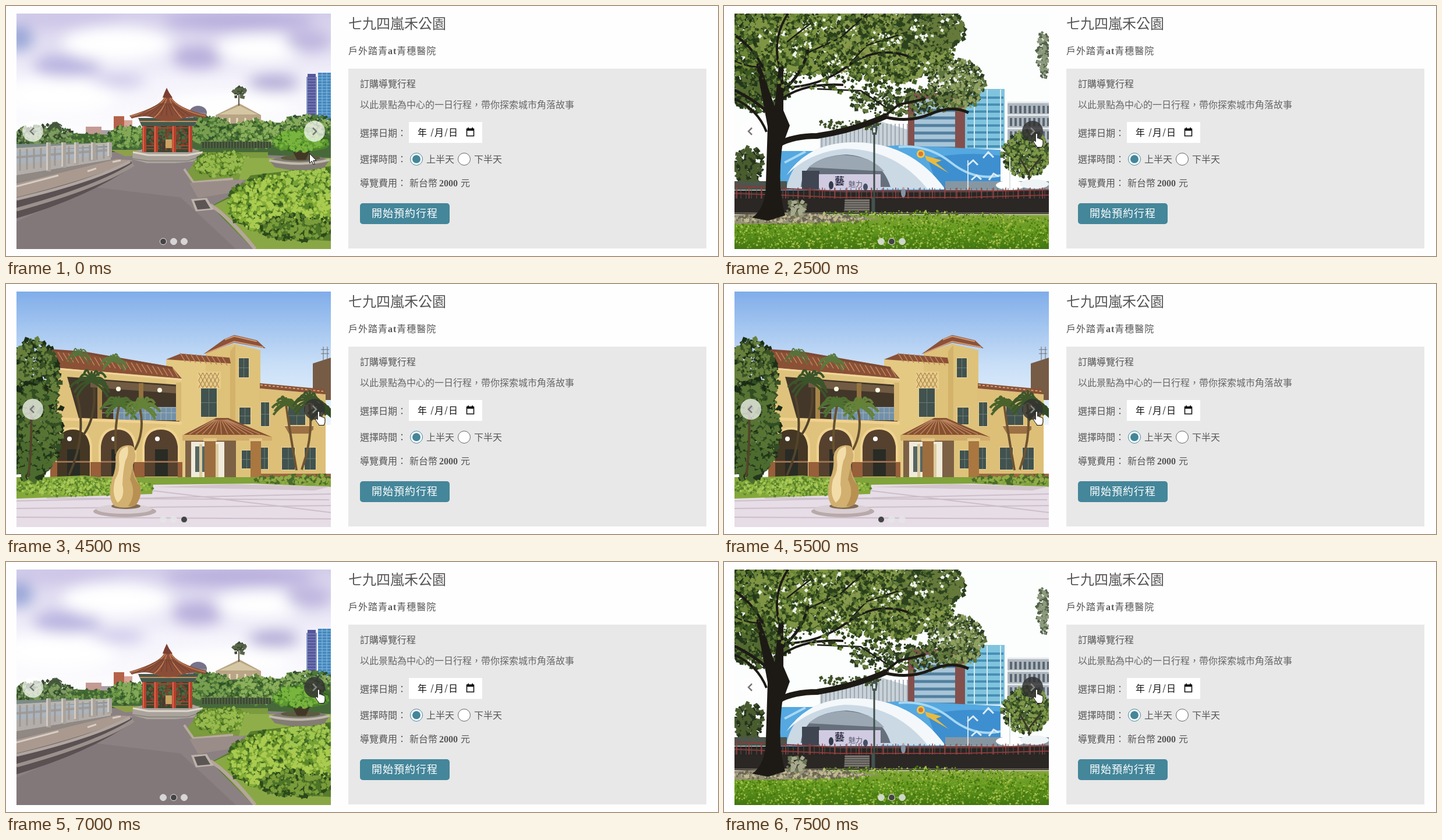
Recreate the animation shown at these times as an HTML page. Size 1223 px wide and 431 px high, loop 8000 ms.

```html
<!DOCTYPE html>
<html lang="zh-Hant-TW">
<head>
<meta charset="utf-8">
<title>導覽行程</title>
<style>
  html, body { margin: 0; width: 100%; height: 100%; overflow: hidden; background: #fefefe; }
  svg { display: block; }
  text { font-family: "Liberation Serif", "Noto Sans CJK TC", "Noto Sans CJK", sans-serif; white-space: pre; }
</style>
</head>
<body>
<svg id="stage" width="1223" height="431" viewBox="0 0 1223 431"></svg>
<script>
let seed = 7;
const rnd = () => (seed = (seed * 16807) % 2147483647) / 2147483647;
const path = (fill, d, more = '') => `<path fill="${fill}" d="${d}" ${more}/>`;
const line = (color, w, d, more = '') =>
  `<path fill="none" stroke="${color}" stroke-width="${w}" d="${d}" ${more}/>`;
const rect = (fill, x, y, w, h, more = '') =>
  `<rect fill="${fill}" x="${x}" y="${y}" width="${w}" height="${h}" ${more}/>`;
const oval = (fill, x, y, rx, ry = rx, more = '') =>
  `<ellipse fill="${fill}" cx="${x}" cy="${y}" rx="${rx}" ry="${ry}" ${more}/>`;
const text = (x, y, size, weight, color, str, more = '') =>
  `<text x="${x}" y="${y}" font-size="${size}" font-weight="${weight}" fill="${color}" ${more}>${str}</text>`;
const repeat = (n, fn) => Array.from({ length: n }, (_, i) => fn(i)).join('');
const fade = (id, ...stops) => `<linearGradient id="${id}" x2="0" y2="1">` +
  stops.map(([o, c]) => `<stop offset="${o}" stop-color="${c}"/>`).join('') + '</linearGradient>';

// Scatter of leaves inside an ellipse: a full dark layer, then sparser lighter ones
function leaves(x, y, rx, ry, n, size, ...colors) {
  return colors.map((c, i) => path(c, repeat(Math.round(n / (1 + i * 0.8)), () => {
    const a = rnd() * 6.283, r = Math.sqrt(rnd()), s = size * (0.5 + rnd()), b = rnd() * 6.283;
    const u = s * Math.cos(b), v = s * Math.sin(b);
    const px = x + rx * r * Math.cos(a), py = y + ry * r * Math.sin(a);
    return `M${px.toFixed(1)} ${py.toFixed(1)}l${u.toFixed(1)} ${v.toFixed(1)} ${(-v).toFixed(1)} ${u.toFixed(1)} ${(-u).toFixed(1)} ${(-v).toFixed(1)}z`;
  }))).join('');
}

function palm(x, y, r, color, w = 2) {
  return line(color, w, repeat(13, i => {
    const a = Math.PI * (1.15 + i / 12 * -1.3), k = r * (0.75 + rnd() * 0.4);
    const dx = k * Math.cos(a), dy = -k * Math.sin(a) * 0.75;
    return `M${x} ${y}q${dx * 0.6} ${dy - r * 0.1} ${dx} ${dy + r * 0.45}`;
  }));
}

function pavilion() {
  const stone = '#a9a39c', red = '#b5402c';
  return rect('url(#sky1)', 18, 13, 540, 230) +
    '<g filter="url(#soft)">' +
    oval('#97a5d6', 22, 55, 24, 22) + oval('#cbc2e6', 110, 22, 90, 10) + oval('#b9b4e0', 105, 102, 58, 20) +
    oval('#cdc8ea', 190, 128, 50, 12) + oval('#fff', 190, 66, 95, 30) + oval('#b7addc', 400, 25, 130, 16) +
    oval('#b8aedb', 330, 88, 45, 20) + oval('#fff', 435, 74, 75, 24) + oval('#bdb5de', 520, 60, 40, 18) +
    oval('#b2abd6', 460, 132, 44, 15) + oval('#fff', 90, 155, 100, 30) + oval('#fff', 380, 170, 110, 20) + '</g>' +
    rect('#8598c8', 516, 122, 18, 72) + rect('#54589a', 518, 117, 14, 76) +
    line('#8f92c8', 1, repeat(14, i => `M518 ${124 + i * 5}h14`)) +
    rect('#4387bd', 536, 115, 22, 82) +
    line('#8bbbe0', 1, repeat(15, i => `M536 ${119 + i * 5}h22`) + 'M543 115v80M551 115v80') +
    rect('#c49a94', 137, 208, 27, 18) + rect('#b5624a', 185, 190, 18, 34) + rect('#d8a398', 203, 197, 14, 28) +
    rect('#aaa0a4', 163, 214, 24, 12) +
    oval('#77738a', 330, 184, 15, 12) + rect('#8c8790', 312, 184, 32, 12) +
    path('#b9a585', 'M360 188L401 168L438 188V226H362Z') + path('#d5c7a4', 'M366 187L401 172L432 187Z') +
    line('#e8dfc4', 3, 'M372 193v28M384 193v28M397 193v28M411 193v28M425 193v28') +
    line('#5a5748', 2, 'M400 154v18') + leaves(400, 149, 9, 8, 30, 4, '#3c4a34', '#5a6648') +
    path('#47693a', 'M18 216L180 222L240 214L330 206L440 200L558 205V262H18Z') +
    leaves(65, 224, 55, 16, 260, 4, '#34492e', '#56793f', '#7f9c60') + palm(84, 207, 13, '#45583c') +
    leaves(210, 226, 34, 18, 230, 4, '#34572a', '#5a873d', '#83a957') +
    leaves(150, 232, 45, 10, 130, 3, '#3f6430', '#6c9846') +
    leaves(350, 215, 38, 24, 330, 4, '#2f4f28', '#4c7836', '#789f50') +
    leaves(430, 220, 48, 22, 330, 4, '#38592a', '#5c8a3c', '#8caf5c') +
    leaves(520, 208, 45, 19, 300, 4, '#2f4d28', '#507b37', '#88aa5c') +
    rect('#3b4b32', 335, 234, 120, 11) + line('#6f7a5d', 1, repeat(24, i => `M${336 + i * 5} 232v13`)) +
    // ground
    path('#8b8183', 'M18 262L215 250L340 252L558 262V419H18Z') +
    path('#776d70', 'M18 419V372L150 312L300 330L395 419Z', 'opacity=".45"') +
    path('#8fa04b', 'M180 248H335L318 254L205 259Z') +
    // lake and railing
    path('#a9b4bf', 'M18 240H178V258L18 276Z') + path('#7d8b86', 'M18 238L178 236V243L18 250Z') +
    line('#b9b5b0', 6, 'M18 248L180 238') + line('#a19b97', 4, 'M18 261L180 248') +
    path('#b4aeaa', 'M18 272L180 256V265L18 292Z') + path('#8f8883', 'M18 292L180 265L205 265L18 304Z') +
    line('#9d9893', 3, repeat(13, i => `M${24 + i * 12} ${247 - i * 0.7}V${284 - i * 1.7}`)) +
    repeat(5, i => { const x = [69, 95, 117, 146, 174][i]; return rect(stone, x, 235, 8, 50 - i * 6) + rect('#d0cac3', x, 235, 3, 48 - i * 6); }) +
    path('#a9998f', 'M18 306L190 264L218 266Q160 300 18 338Z') +
    line('#d7cdc2', 3, 'M18 311L90 292M140 285l15-5M183 269l14-3') +
    path('#5b5153', 'M214 268Q140 300 18 330V366Q140 330 220 275Z') +
    line('#b0a6a0', 5, 'M213 268Q150 302 18 333') + line('#9b918c', 6, 'M219 273Q160 312 18 351') +
    // pavilion
    path(stone, 'M218 252L237 246H322L338 253L322 268L290 271H242L217 264Z') +
    line('#e0d8cc', 3, 'M218 252L244 257H312L338 252') + line('#756f6c', 1, 'M217 263L244 267H312L330 261') +
    rect('#38462f', 238, 204, 79, 48) + leaves(278, 226, 36, 20, 110, 4, '#4d6840', '#7b412c') +
    rect('#c9a463', 274, 230, 11, 15) + rect('#4b3a2e', 268, 235, 5, 16) + rect('#4b3a2e', 287, 235, 5, 16) +
    line(red, 2, 'M236 210H320M236 241H262M294 241H320') + line('#c8513a', 1, 'M234 246H264M292 246H322') +
    [234, 254, 285, 313].map(x => rect(red, x, 203, 7, 49) + rect('#d6674c', x + 1, 203, 2, 49)).join('') +
    path('#46594d', 'M227 193H331L323 207H233Z') + line('#cc8e5b', 2, 'M230 199H328') +
    path('#8a4e38', 'M272 157Q264 174 212 189L216 194Q242 186 258 195Q278 202 302 195Q322 187 343 193L345 188Q294 176 284 157Z') +
    line('#bd7a52', 2, 'M274 158Q262 178 214 190M282 158Q298 180 343 190M276 160Q270 180 254 193M281 160Q288 180 302 193') +
    line('#6b3a2c', 1, repeat(10, i => `M${276 + (i - 5) * 2} 168L${276 + (i - 5) * 10} 189`)) +
    path('#7b3f32', 'M269 158L272 150L276 141L280 149L286 158Z') +
    // lawns
    path('#7c9a3e', 'M310 288L338 252H450V282L388 302H316Z') + line('#b8aaa0', 4, 'M306 281L322 304L390 298') +
    leaves(372, 272, 48, 19, 430, 4, '#466a24', '#6c962f', '#98ba4e') +
    path('#9a8d89', 'M315 305L410 299L385 322L330 331Z') +
    path('#8fae4a', 'M410 262H558V290L400 300Z') +
    path('#587d2c', 'M352 345L395 322L420 292L558 276V419H425Z') +
    path('#8aa746', 'M355 345L386 330L400 375L470 400L558 405V419H425Z') +
    line('#b5a69c', 6, 'M351 343Q385 365 428 419') +
    leaves(474, 342, 92, 50, 1200, 5, '#365a20', '#5b8629', '#84ad37', '#aacb50') +
    leaves(520, 300, 40, 24, 240, 5, '#446c25', '#75a235', '#a3c650') +
    leaves(500, 383, 60, 20, 330, 5, '#2b481b', '#4d7427', '#7a9c3a') +
    path('#beb3aa', 'M318 333L345 331L357 351L326 354Z') + path('#5b5653', 'M323 336L342 334L351 349L329 351Z') +
    // planter tree
    path('#837d73', 'M452 266L470 260H540L556 266L546 279L520 283H488L462 278Z') +
    line('#c0b9ae', 4, 'M452 266Q505 278 556 265') + oval('#5b5b3f', 506, 262, 34, 5) +
    path('#423727', 'M490 246H524L515 265H500Z') +
    path('#4c842a', 'M460 243Q463 218 503 213Q548 213 553 244Q530 253 508 248Q480 252 460 243Z') +
    leaves(507, 233, 44, 16, 380, 4, '#35661f', '#5d9a31', '#79b53e');
}

function bandstand() {
  const bark = '#1d1a15';
  return rect('#fcfdfd', 18, 13, 540, 406) +
    // buildings
    path('#c9d2d8', 'M165 220L260 196L318 214V250H165Z') +
    line('#8e9aa5', 1.5, repeat(22, i => `M${168 + i * 7} ${224 - Math.min(i, 14) * 1.5}V246`)) +
    rect('#84504d', 316, 150, 100, 100) + rect('#a8c5d8', 327, 160, 70, 88) +
    line('#527f9f', 5, repeat(6, i => `M327 ${180 + i * 13}h70`)) +
    path('#80c3dd', 'M414 160L440 143H482V246H414Z') + line('#488fb5', 4, repeat(8, i => `M418 ${158 + i * 12}h62`)) +
    line('#d5eef5', 2, 'M430 150v95M452 144v102M475 144v102') +
    rect('#aeb6be', 487, 166, 71, 80) + line('#e9eef0', 3, 'M487 166H558M487 188H558M487 211H558') +
    line('#5a6670', 4, repeat(9, i => `M${493 + i * 8} 172v13m0 8v14m0 9v14`)) +
    // mural
    path('#55a8e0', 'M92 250H170L300 240L475 248V318H92Z') + path('#3d8fd0', 'M350 264Q405 250 475 258V318H370Z') +
    line('#a6d8f3', 4, 'M300 243Q350 238 390 270T475 292M104 270L140 251') +
    line('#dcebf5', 3, 'M418 275l10-9 8 8M445 262l9-10 9 9M455 300l8-11 9 5M425 300l9-8 8 7') +
    path('#e8bb42', 'M345 258L374 266L364 270L386 288L348 266Z') + oval('#f3c848', 338, 255, 7) + oval('#d87a35', 338, 255, 4) +
    // stage shell
    path('#cbd9e4', 'M108 310Q125 240 215 235Q320 232 380 316H108Z') +
    path('#f4f8fa', 'M107 292Q145 236 220 235Q320 233 380 316H350Q294 246 207 246Q146 252 107 292Z') +
    path('#66707c', 'M132 312Q136 260 210 256Q270 260 286 312Z') +
    path('#9ba8b4', 'M145 278Q168 258 208 257Q255 260 275 285Z') +
    rect('#3f4551', 134, 284, 30, 32) + rect('#d0cbe0', 163, 290, 106, 27) +
    text(190, 308, 17, 700, '#303047', '藝') + text(214, 312, 12, 500, '#58566d', '魅力') +
    oval('#343a4c', 184, 309, 4, 7) + oval('#465064', 243, 312, 4, 6) +
    // right side trees, cars
    leaves(520, 255, 40, 38, 520, 4, '#26391e', '#455f2a', '#7f9848') +
    line('#3c3a29', 3, 'M524 285V318M524 290L508 262M525 285L545 260') +
    leaves(549, 84, 9, 38, 95, 4, '#526249', '#8d9a7c') +
    rect('#8797a2', 380, 302, 178, 16) + oval('#fff', 492, 309, 25, 8) + oval('#eef3f6', 533, 307, 25, 8) +
    line('#dce4e3', 2, 'M419 266V316M491 260V316') +
    leaves(43, 275, 25, 30, 180, 5, '#26331c', '#485c2e') + rect('#4d554c', 18, 302, 90, 15) +
    // fence
    rect('#282624', 18, 318, 540, 41) + line('#5d544f', 1, repeat(60, i => `M${20 + i * 9} 314v18`)) +
    line('#8d3838', 2, 'M18 310L205 320H420L558 317M18 323L200 330H410L558 326') +
    line('#9b4441', 1.5, repeat(26, i => `M${22 + i * 21} 313v19`)) +
    rect('#2b2725', 18, 334, 540, 22) + line('#6b6355', 2, 'M18 357H558') +
    path('#57534f', 'M208 333H250V354H206Z') + line('#a5a099', 1, repeat(5, i => `M207 ${335 + i * 4}h43`)) +
    oval('#8494a5', 308, 322, 4, 8) + oval('#c7a697', 308, 314, 2) +
    // lawn
    rect('url(#lawn)', 18, 360, 540, 59) + leaves(290, 390, 350, 36, 1900, 2.2, '#47780f', '#7fa92c', '#a6bf4a') +
    path('#98917a', 'M18 360L110 356L270 366Q160 377 18 375Z') + leaves(125, 367, 120, 6, 200, 3, '#6a6850', '#c3b891') +
    // tree
    leaves(45, 78, 75, 85, 1150, 5.5, '#1e2f15', '#3b5620', '#6c8638') +
    leaves(160, 58, 120, 58, 1700, 5.5, '#243818', '#486427', '#7f9544') +
    leaves(290, 68, 105, 63, 1300, 5.5, '#26391b', '#4b672a', '#86994c') +
    leaves(355, 40, 56, 40, 380, 5.5, '#2c421f', '#64793a') +
    leaves(398, 136, 48, 43, 400, 4.5, '#2c3e21', '#5d743c', '#8f9f60') +
    leaves(305, 165, 90, 24, 240, 4.5, '#2a3d1f', '#62783c') +
    leaves(60, 150, 50, 32, 300, 5, '#25371a', '#526a30') +
    leaves(218, 205, 55, 9, 60, 4, '#3f5229') +
    repeat(34, () => leaves(65 + rnd() * 330, 25 + rnd() * 110, 11, 8, 6, 4, '#eef3e9')) +
    path(bark, 'M48 365Q72 349 72 305L75 208L55 100L61 98L87 173L94 104L102 102L102 180L113 206L100 242Q91 312 105 361L76 370Z') +
    line(bark, 10, 'M94 238Q120 224 160 224Q225 214 280 189') +
    line(bark, 5, 'M275 191Q318 202 355 186T420 184M82 190Q58 165 18 145M97 150Q138 115 144 75') +
    line(bark, 4, 'M70 112Q50 70 20 52M97 110Q80 60 110 13M99 140Q160 142 212 104T320 88M93 165Q132 132 205 136M73 217Q58 178 18 160M272 193L300 170L345 160') +
    line(bark, 2.5, 'M61 105Q38 105 18 94M108 62L155 25M145 80L200 55L246 13M210 106L245 68L315 45M160 143L235 146L280 176') +
    leaves(200, 80, 190, 68, 420, 4.5, '#2b401b', '#6c8538') +
    // lamp
    line('#3e4e49', 3, 'M258 220V355') + line('#44534f', 5, 'M256 330V355') +
    path('#45534f', 'M253 209L258 203L264 209L262 222H255Z') + rect('#d9e2dd', 256, 210, 4, 8) +
    leaves(124, 348, 20, 7, 30, 5, '#6b7657', '#a7a98c');
}

function museum() {
  const wall = '#dfc37d', shade = '#c49d58', dark = '#43372a', tile = '#8a5136';
  const win = (x, y, w, h) => rect('#ead59a', x - 1, y - 1, w + 2, h + 2) + rect('#41524f', x, y, w, h) +
    line('#6c7c72', 1, `M${x + w / 2} ${y}v${h}M${x} ${y + h / 2}h${w}`);
  const tiles = (x, y, n, dx, dy) => line('#c08660', 1.5, repeat(n, i => `M${x + i * dx} ${y + i * dy}l9 15`));
  return rect('url(#sky3)', 18, 13, 540, 230) +
    // walls
    path('#765b45', 'M527 137L558 127V200H527Z') + line('#716d6b', 1, 'M545 108v24M552 108v22M541 113h14M541 120h14') +
    path(wall, 'M76 137L300 160V338H76Z') + path('#e4c983', 'M275 130L385 135V340H275Z') +
    path('#dfc27a', 'M343 119L392 103L437 114V345H343Z') + path('#ddbf78', 'M435 180L549 190V334H435Z') +
    path(shade, 'M385 116L394 105L394 334H385Z', 'opacity=".45"') +
    // roofs
    path(tile, 'M74 113L132 117L285 143L302 163L80 144Z') + tiles(80, 116, 24, 9, 1.3) +
    line('#f0d69d', 3, 'M78 145L302 165') + line('#7e4933', 4, 'M74 114L132 118L286 145') +
    path(tile, 'M275 130L300 120L384 127L386 137L305 132Z') + tiles(299, 119, 9, 9, 0.8) +
    path('#8c5138', 'M339 121L375 95L392 88L431 97L446 111L392 101Z') + line('#d49b72', 2, 'M345 119L392 99L442 109M376 96L392 90L431 99') +
    path(tile, 'M436 171L543 181L549 190L436 180Z') + line('#d6a276', 2, 'M437 174L545 185', 'stroke-dasharray="4 3"') +
    // balcony
    path(dark, 'M105 160L298 174V237L125 231Z') + path('#715b43', 'M145 165L298 177V189L145 178Z') +
    rect('#a98749', 157, 167, 8, 66) + rect('#94733f', 228, 171, 8, 65) + rect('#d7b873', 292, 170, 9, 66) +
    rect('#7190aa', 185, 212, 107, 23) + line('#a9b4b3', 1, 'M165 213H294M165 222H294' + repeat(12, i => `M${185 + i * 9} 212v23`)) +
    oval('#fffbe5', 193, 181, 4) + oval('#fffbe5', 264, 183, 4) + line('#f1d18d', 5, 'M76 232L302 240') +
    // arches
    [87, 163, 238].map((x, i) => path('#f0d391', `M${x - 4} 332V278Q${x - 1} 247 ${x + 28} 247T${x + 61} 278V332Z`) +
      path(i ? '#55412d' : '#443724', `M${x} 332V280Q${x + 3} 251 ${x + 28} 251T${x + 57} 280V332Z`) +
      rect('#292b25', x + 18, 285, 22, 46) + oval('#fff', x + 22, 267, 4) + rect('#9b7150', x, 305, 57, 3)).join('') +
    path('#985f3b', 'M76 307H88V334H76ZM145 307H163V334H145ZM220 307H238V334H220ZM295 307H303V334H295Z') +
    // facade
    rect('#e8cc88', 329, 151, 40, 30) + line('#9b7443', 1, repeat(5, i => `M${331 + i * 7} 153l7 13-7 13M${338 + i * 7} 153l-7 13 7 13`)) +
    win(335, 180, 27, 49) + win(400, 128, 17, 33) + win(401, 213, 19, 29) + win(438, 204, 14, 41) +
    win(485, 210, 29, 34) + win(405, 287, 17, 31) + win(438, 282, 12, 37) + win(474, 282, 22, 38) + win(513, 282, 19, 38) +
    path('#9c7044', 'M478 244H528V251L519 258H486Z') + line('#e7ca8c', 2, 'M478 244H528') +
    // porch
    rect('#7c6145', 308, 266, 87, 70) + rect('#f0eada', 318, 272, 57, 61) +
    rect('#566663', 325, 280, 16, 44) + rect('#566663', 345, 280, 16, 44) + rect('#dccb9e', 332, 276, 5, 57) + rect('#dccb9e', 360, 276, 5, 57) +
    path('#85502f', 'M305 260L361 231L382 231L457 264L421 260Z') +
    line('#bd8662', 1.5, repeat(12, i => `M${358 + i * 2} 234L${315 + i * 11} 259`)) +
    path('#d2ac6b', 'M303 260H440L457 264V270H303Z') + rect('#9c6d3f', 341, 269, 19, 74) + rect('#a9773f', 420, 269, 18, 75) +
    rect('#e4c787', 339, 266, 23, 5) + rect('#e4c787', 418, 266, 22, 5) +
    rect('#9c6940', 438, 327, 120, 8) +
    // ground
    path('#80a33a', 'M18 333H303L558 333V350H18Z') + leaves(500, 337, 70, 7, 130, 4, '#486b2b', '#8fab45') +
    path('#e6dde6', 'M250 346L425 344L558 350V419H18V367Z') +
    path('#d2c5cb', 'M255 350L390 345L558 349L530 356Z') +
    line('#b9a7b4', 2, 'M18 374L558 362M18 387L558 382M18 402L558 405M70 369L555 372M250 356L558 394', 'opacity=".55"') +
    path('#83a83a', 'M18 335L135 330L253 345L251 362L18 370Z') + leaves(130, 350, 120, 14, 450, 3, '#56802a', '#92b842', '#aac959') +
    // planting
    leaves(48, 160, 43, 62, 720, 5, '#1d2f16', '#385225', '#67803c') +
    leaves(50, 247, 44, 80, 800, 6, '#1b2b15', '#324c23', '#577434') +
    leaves(41, 305, 32, 30, 240, 6, '#223619', '#4c6b2f') +
    line('#53442b', 4, 'M43 210Q45 285 38 333M122 192Q140 260 108 330M151 178Q155 230 133 260') +
    palm(124, 122, 21, '#56723b') + palm(147, 168, 36, '#3b5429', 4) + palm(184, 132, 22, '#5c793d', 3) +
    line('#67512f', 4, 'M195 205Q185 254 189 293M230 214Q239 255 221 286') +
    palm(194, 208, 30, '#4f7030', 4) + palm(235, 212, 29, '#648238', 4) +
    line('#6e5432', 4, 'M481 207Q489 265 499 321M521 207Q529 260 508 320') +
    palm(481, 207, 23, '#4a622c', 4) + palm(522, 202, 30, '#3e562a', 4) + palm(543, 218, 22, '#344a25', 4) +
    // sculpture
    oval('#b8aaa9', 204, 392, 54, 10) + oval('#d9ced3', 203, 388, 48, 8) + oval('#806c55', 206, 383, 25, 5) +
    path('#d2b06f', 'M221 289Q222 277 208 278Q190 280 188 299Q190 318 182 336Q174 373 187 383Q206 389 223 381Q235 365 230 347Q218 330 218 312Q225 298 221 289Z') +
    path('#f2dda9', 'M209 280Q193 283 194 302Q197 321 187 338Q181 364 192 377Q205 367 200 346Q201 321 205 305Q212 293 209 280Z') +
    path('#a77c40', 'M218 313Q216 333 230 347Q235 365 223 381Q215 384 210 383Q225 361 213 337Z', 'opacity=".6"');
}

function panel() {
  const teal = '#44869a', ink = '#555';
  return text(588, 39, 24, 500, ink, '七九四嵐禾公園') +
    text(588, 83, 16, 500, ink, '戶外踏青<tspan font-weight="700">at</tspan>青穗醫院', 'letter-spacing="1"') +
    rect('#e8e8e8', 588, 108, 615, 310) +
    text(608, 140, 16, 500, ink, '訂購導覽行程') +
    text(608, 176, 16, 300, '#666', '以此景點為中心的一日行程，帶你探索城市角落故事') +
    text(608, 225, 16, 500, ink, '選擇日期：') + rect('#fff', 692, 200, 126, 36) +
    text(707, 224, 16, 400, '#111', '年') + text(736, 224, 16, 400, '#111', '月') + text(760, 224, 16, 400, '#111', '日') +
    line('#222', 1, 'M730 225L734 211M754 225L758 211') +
    line('#111', 1.6, 'M791.5 212.5H803.5V224H791.5Z') + rect('#111', 791, 211, 13, 4) + line('#111', 2, 'M794 209.5v3M801 209.5v3') +
    text(608, 270, 16, 500, ink, '選擇時間：') +
    oval('#fff', 705, 264, 10.5, 10.5, `stroke="${teal}"`) + oval(teal, 705, 264, 7) + text(722, 270, 16, 400, ink, '上半天') +
    oval('#fff', 787, 264, 10.5, 10.5, 'stroke="#666"') + text(804, 270, 16, 400, ink, '下半天') +
    text(608, 311, 16, 500, ink, '導覽費用：') + text(693, 311, 16, 500, ink, '新台幣') +
    text(744, 311, 16, 700, ink, '2000') + text(781, 311, 16, 500, ink, '元') +
    rect(teal, 608, 340, 154, 36, 'rx="5"') + text(628, 364, 18, 400, '#fff', '開始預約行程', 'letter-spacing="1"');
}

const stage = document.getElementById('stage');
stage.innerHTML = '<defs><clipPath id="photo"><path d="M18 13H558V419H18Z"/></clipPath>' +
  '<filter id="soft" x="-10%" y="-10%" width="120%" height="120%"><feGaussianBlur stdDeviation="12"/></filter>' +
  fade('sky1', [0, '#d3cdea'], [0.5, '#f4f2fb'], [1, '#fff']) + fade('sky3', [0, '#80ade9'], [0.55, '#c9dff7'], [1, '#eef5fb']) +
  fade('lawn', [0, '#86a63a'], [0.4, '#649a20'], [1, '#417512']) + '</defs>' +
  rect('#fefefe', 0, 0, 1223, 431) + panel() +
  '<g clip-path="url(#photo)">' + [pavilion, bandstand, museum].map(draw => `<g class="slide">${draw()}</g>`).join('') + '</g>' +
  oval('#fff', 46, 216, 18, 18, 'opacity=".7"') + line('#777', 2.5, 'M48 210L42 216L48 222') +
  '<g id="next"><circle cx="530" cy="216" r="18"/><path d="M527 210L533 216L527 222" fill="none" stroke-width="2.5"/></g>' +
  repeat(3, i => `<circle class="dot" cx="${270 + i * 18}" cy="406" r="5.5"/>`) +
  path('#fff', 'M.5 .5V17L4.3 13.4L6.9 19.4L9.3 18.4L6.8 12.6H12Z', 'id="arrow" stroke="#111" transform="translate(521 254)"') +
  path('#fff', 'M4.2 2.4Q4.2 .6 5.9 .6T7.6 2.4V9q3-.9 3.6 1.2q2.6-.6 3 1.2q2.7-.3 2.7 2v5q0 2.2-1.6 4.6V24.5H6.3V23Q3 19.5 .8 15.2Q.3 12.6 2.4 12.9L4.2 14.8Z', 'id="hand" stroke="#111"');

const slides = stage.querySelectorAll('.slide'), dots = stage.querySelectorAll('.dot');
const [disc, chevron] = stage.querySelector('#next').children;
const arrow = stage.querySelector('#arrow'), hand = stage.querySelector('#hand');
const set = (el, attrs) => { for (const k in attrs) el.setAttribute(k, attrs[k]); };
const show = (el, on) => set(el, { visibility: on ? 'visible' : 'hidden' });

// Value of the last [time, value] step already reached
const step = (t, steps) => steps.filter(s => s[0] <= t).pop()[1];
const SLIDES = [[0, 0], [2500, 1], [4500, 2], [5750, 0], [7250, 1]];
const DOTS = [[0, 0], [1250, 1], [4000, 2], [5500, 0], [7000, 1]];

function render(t) {
  const slide = step(t, SLIDES), dot = step(t, DOTS), hover = t >= 250;
  slides.forEach((el, i) => show(el, i === slide));
  dots.forEach((el, i) => set(el, i === dot
    ? { fill: '#444', stroke: '#e6e6e6', opacity: 1 }
    : { fill: '#e6e6e6', stroke: '#e6e6e6', opacity: 0.85 }));
  set(disc, hover ? { fill: '#333', opacity: 0.84 } : { fill: '#fff', opacity: 0.7 });
  set(chevron, { stroke: hover ? '#898685' : '#777' });
  show(arrow, !hover);
  show(hand, hover);
  set(hand, { transform: t < 500 ? 'translate(536 224)' : 'translate(531 219)' });
}

const start = performance.now();
function tick() {
  render((performance.now() - start) % 8000);
  requestAnimationFrame(tick);
}
tick();
</script>
</body>
</html>
```
